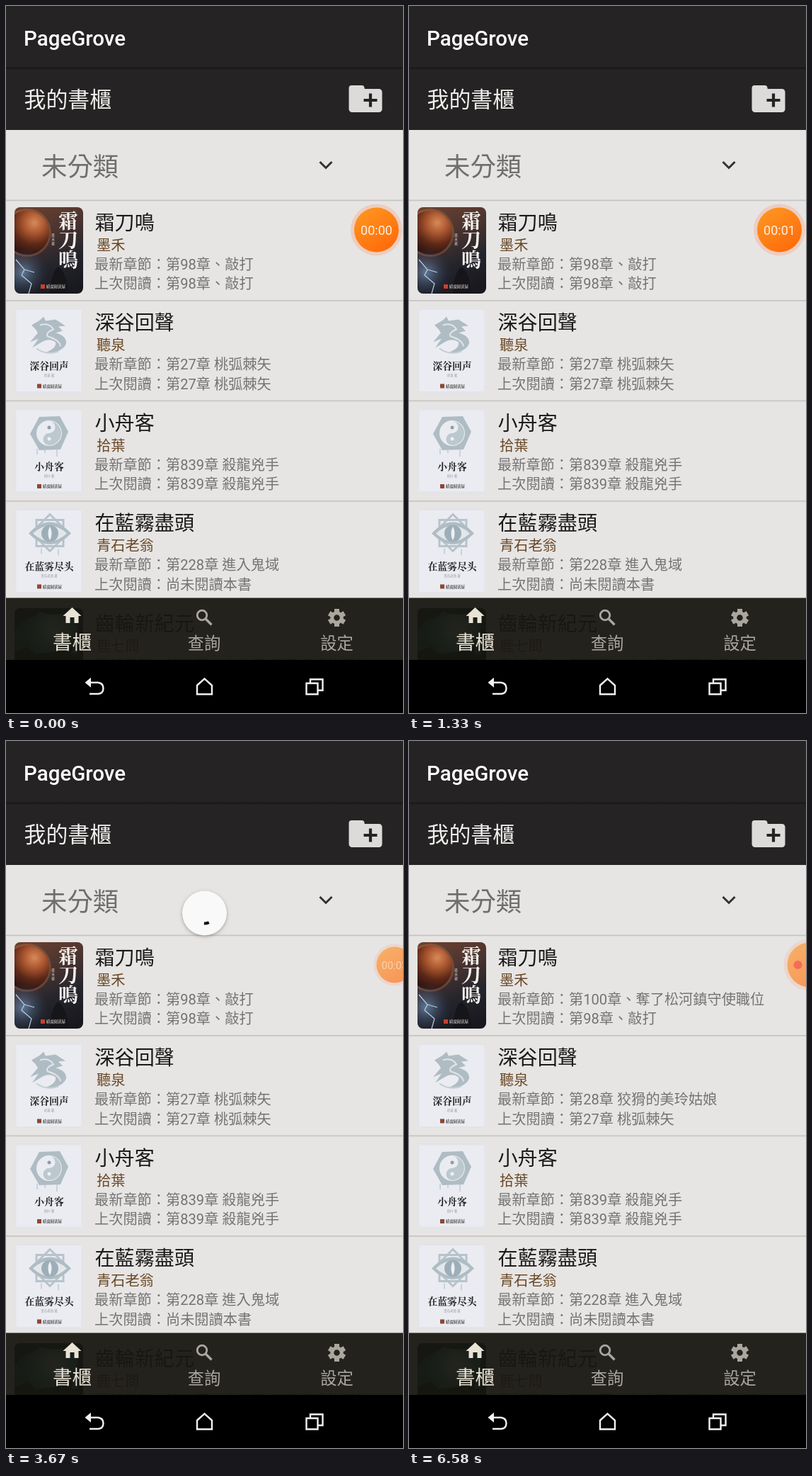
Write an HTML page with a canvas that moves like this. It is 561 px wide and 998 px high and loops after 8000 ms.

```html
<!DOCTYPE html>
<html lang="zh-Hant">
<head>
<meta charset="utf-8">
<style>
html, body { margin: 0; width: 100%; height: 100%; overflow: hidden; background: #000; }
canvas { display: block; }
</style>
</head>
<body>
<canvas id="stage" width="561" height="998"></canvas>
<script>
const c = document.getElementById('stage').getContext('2d');
const SANS = 'Roboto, "Noto Sans CJK TC", "Noto Sans CJK", sans-serif';
const SERIF = '"Noto Serif CJK SC", "Noto Sans CJK SC", "Noto Sans CJK", serif';
const LOOP = 8000, FPS = 12, TAU = Math.PI * 2, RAD = Math.PI / 180;
const BAR = '#252324', PAPER = '#e7e5e3', STEEL = '#afbcc4';

const books = [
  { title: '霜刀鳴', author: '墨禾', latest: '第98章、敲打', last: '第98章、敲打',
    updated: '第100章、奪了松河鎮守使職位', art: planetCover },
  { title: '深谷回聲', author: '聽泉', latest: '第27章 桃弧棘矢', last: '第27章 桃弧棘矢',
    updated: '第28章 狡猾的美玲姑娘', art: paleCover('深谷回声', '听泉 著', dragon) },
  { title: '小舟客', author: '拾葉', latest: '第839章 殺龍兇手', last: '第839章 殺龍兇手',
    art: paleCover('小舟客', '拾叶 著', hexagon) },
  { title: '在藍霧盡頭', author: '青石老翁', latest: '第228章 進入鬼域', last: '尚未閱讀本書',
    art: paleCover('在蓝雾尽头', '青石老翁 著', eye) },
  { title: '齒輪新紀元', author: '鹿七問', latest: '第四百二十八章 不聽招呼的源能',
    last: '第四百二十八章 不聽招呼的源能', art: moonCover },
];

// ---------- helpers ----------
const clamp = x => Math.max(0, Math.min(1, x));

function track(t, keys) {
  let i = 1;
  while (i < keys.length - 1 && t > keys[i][0]) i++;
  const [t0, v0] = keys[i - 1], [t1, v1] = keys[i];
  return v0 + (v1 - v0) * clamp((t - t0) / (t1 - t0));
}

// cubic-bezier(.4, 0, .2, 1)
function fastOutSlowIn(x) {
  let lo = 0, hi = 1;
  for (let i = 0; i < 20; i++) {
    const u = (lo + hi) / 2, v = 1 - u;
    if (1.2 * v * v * u + 0.6 * v * u * u + u * u * u < x) lo = u; else hi = u;
  }
  return lo * lo * (3 - 2 * lo);
}

// y is the vertical centre of the ideographs
function text(s, x, y, size, color, { weight = 400, font = SANS, align = 'left' } = {}) {
  c.font = `${weight} ${size}px ${font}`;
  c.textAlign = align;
  c.fillStyle = color;
  c.fillText(s, x, y + size * 0.38);
}

function rect(x, y, w, h, color) { c.fillStyle = color; c.fillRect(x, y, w, h); }

function disc(x, y, r, color) {
  c.fillStyle = color;
  c.beginPath(); c.arc(x, y, r, 0, TAU); c.fill();
}

function shape(d, color, x = 0, y = 0) {
  c.save(); c.translate(x, y);
  c.fillStyle = color; c.fill(new Path2D(d), 'evenodd');
  c.restore();
}

function line(d, color, width, x = 0, y = 0) {
  c.save(); c.translate(x, y);
  c.strokeStyle = color; c.lineWidth = width; c.stroke(new Path2D(d));
  c.restore();
}

function addStops(g, colors) {
  colors.forEach((k, i) => g.addColorStop(i / (colors.length - 1), k));
  return g;
}
const gradient = (x0, y0, x1, y1, ...colors) => addStops(c.createLinearGradient(x0, y0, x1, y1), colors);
const glow = (x, y, r, ...colors) => addStops(c.createRadialGradient(x, y, 0, x, y, r), colors);

// ---------- covers, drawn in a 97 x 122 box ----------
function imprint(x, y, mark, color) {
  rect(x, y - 3, 6, 6, mark);
  text('晴窗阅读屋', x + 8, y, 5.4, color, { weight: 700, font: SERIF });
}

function planetCover() {
  rect(0, 0, 97, 122, gradient(20, 0, 70, 122, '#6a4030', '#4a3430', '#24242c', '#18181e'));
  disc(18, 36, 34, 'rgba(235,140,80,.25)');
  disc(18, 36, 31, glow(28, 22, 46, '#d78a58', '#a9552f', '#5c2817', '#2c1512'));
  rect(0, 60, 60, 62, glow(12, 92, 36, 'rgba(130,165,205,.65)', 'rgba(40,60,90,0)'));
  line('M2 74 L14 88 L10 96 L24 108 L20 122 M14 88 L28 92', '#b5cde6', 1.2);
  shape('M50 122 Q52 90 62 84 Q74 92 76 122Z', '#15151a');
  [...'霜刀鳴'].forEach((ch, i) =>
    text(ch, 76, 19 + i * 27.5, 28, '#f5f2ee', { weight: 900, font: SERIF, align: 'center' }));
  [...'墨禾著'].forEach((ch, i) => text(ch, 52, 39 + i * 6, 5, '#d8cfc8'));
  imprint(37, 112, '#c8402c', '#d0c8c4');
}

function paleCover(name, by, drawArt) {
  return () => {
    rect(0, 0, 97, 122, '#e3e4e8');
    rect(2.5, 3.5, 92, 115, '#eaecf1');
    drawArt();
    text(name, 49, 82.5, 13.8, '#242426', { weight: 700, font: SERIF, align: 'center' });
    text(by, 49, 96, 4.5, '#9a9ca0', { align: 'center' });
    imprint(32, 111, '#8d4636', '#3c3a3a');
  };
}

function dragon() {
  shape('M24 25 L36 18 L41 13 L44 19 L58 17 L72 26 L62 27 L68 33 L58 36 Q74 40 73 51 Q67 65 43 64 Q60 58 58 49 Q50 43 40 48 L25 57 L34 44 L22 49 L33 36 L30 31Z', STEEL);
  line('M36 25 Q49 21 55 31 Q43 36 47 41 Q64 46 65 55', '#dfe5e9', 2);
  line('M31 58 Q45 68 62 62', '#c3cdd4', 2);
}

function hexagon() {
  shape('M35 13 L64 12 L76 34 L65 59 L35 60 L22 37Z M49 18 A18 18 0 1 0 49 54 A18 18 0 1 0 49 18Z', STEEL);
  shape('M49 19 A17 17 0 0 1 49 53 A8.5 8.5 0 0 1 49 36 A8.5 8.5 0 0 0 49 19Z', '#bcc8cf');
  disc(49, 28, 2.5, '#8d9da8');
  disc(49, 44, 2.5, '#eef0f4');
  line('M32 58 V66 M43 60 V64 M60 59 V69', '#c0cad1', 1.5);
}

function eye() {
  line('M50 9 L76 35 L50 61 L24 35Z M31 17 H69 V54 H31Z', '#b7c3cb', 3);
  shape('M20 36 Q50 4 80 36 Q50 67 20 36Z', STEEL);
  shape('M26 36 Q50 14 74 36 Q50 58 26 36Z', '#e2e7eb');
  disc(50, 36, 12, '#9eaeb8');
  shape('M50 26 Q55 36 50 46 Q45 36 50 26Z', '#eef0f4');
  line('M38 57 V65 M62 58 V67', '#c0cad1', 1.5);
}

function moonCover() {
  rect(0, 0, 97, 122, gradient(0, 0, 20, 122, '#0a3f49', '#177a82', '#0a2c33', '#081417'));
  rect(0, 0, 97, 90, glow(56, 32, 54, '#d9f2ea', '#8fd0cb', 'rgba(40,150,155,.7)', 'rgba(10,60,70,0)'));
  shape('M0 0 H97 V46 L88 34 Q94 16 78 6 Q52 12 36 5 Q28 14 12 17 L0 32Z', '#08242b');
  shape('M0 62 L18 54 L30 65 L60 61 L82 53 L97 58 V122 H0Z', '#07191d');
  shape('M80 64 L85 48 L90 64Z', '#2a9aa0');
  text('齒輪新紀元', 44, 92, 16, '#c9d2d0', { weight: 900, align: 'center' });
}

// ---------- list ----------
function book(b, top, refreshed) {
  rect(0, top - 0.5, 561, 1.8, '#c8c6c4');
  c.save();
  c.translate(12, top + 10);
  c.beginPath(); c.roundRect(0, 0, 97, 122, 8); c.clip();
  b.art();
  c.restore();
  text(b.title, 125.5, top + 31, 28.1, '#1b1919');
  text(b.author, 128, top + 63, 20.2, '#684726');
  const latest = refreshed && b.updated || b.latest;
  text('最新章節：' + latest, 125, top + 90.3, 20.2, '#757372');
  text('上次閱讀：' + b.last, 125, top + 117.6, 20.2, '#757372');
}

function list(scroll, refreshed) {
  rect(0, 174, 561, 749, PAPER);
  text('未分類', 50, 226 - scroll, 36.4, '#706e6d');
  line('M443.5 220 l8.5 8.5 l8.5 -8.5', '#333131', 3, 0, -scroll);
  books.forEach((b, i) => book(b, 274 + i * 141.5 - scroll, refreshed));
  rect(0, 981 - scroll, 561, 1.8, '#c8c6c4');
}

function bottomTabs(shift) {
  const cream = '#e9e3d6', grey = '#aaa79f';
  c.save();
  c.translate(0, shift);
  rect(0, 835.5, 561, 90, 'rgba(24,23,16,.94)');
  shape('M-13 1 L0 -11 L13 1 H9 V11 H3 V3 H-3 V11 H-9 V1Z', cream, 93.5, 860);
  text('書櫃', 93.5, 897.5, 27.5, cream, { align: 'center' });

  c.strokeStyle = grey; c.lineWidth = 2.8;
  c.beginPath(); c.arc(277, 860, 6.8, 0, TAU); c.stroke();
  line('M282 865 L290.5 873.5', grey, 3.4);
  text('查詢', 280, 899, 23.3, grey, { align: 'center' });

  c.save();
  c.translate(467.5, 863.5);
  c.fillStyle = grey;
  for (let i = 0; i < 6; i++) { c.fillRect(-3.5, -12.5, 7, 8); c.rotate(TAU / 6); }
  c.lineWidth = 5; c.strokeStyle = grey;
  c.beginPath(); c.arc(0, 0, 6.8, 0, TAU); c.stroke();
  c.restore();
  text('設定', 467.5, 899, 23.3, grey, { align: 'center' });
  c.restore();
}

// ---------- pull-to-refresh indicator ----------
const RELEASE = 1698, SPIN = 1898, CYCLES = 2564, CYCLE = 1332, FREEZE = 6335;

function arcAngles(t) {
  if (t < SPIN) {
    const end = track(t, [[1417, -60], [1583, 34], [1698, 45]]);
    return [end - track(t, [[1400, 60], [1560, 288]]), end];
  }
  if (t < CYCLES) {
    const p = (t - SPIN) / (CYCLES - SPIN), end = 45 + 238 * p;
    return [end - 3.6 - 284.4 * (1 - fastOutSlowIn(p)), end];
  }
  const time = (Math.min(t, FREEZE) - CYCLES) / CYCLE;
  const n = Math.floor(time), p = time - n;
  const base = -77 + 216 * n + 291.6 * p;
  if (p < 0.5) return [base, base + 3.6 + 284.4 * fastOutSlowIn(2 * p)];
  return [base + 284.4 * fastOutSlowIn(2 * p - 1), base + 288];
}

function refresher(t) {
  if (t < 1340 || t > 6570) return;
  const y = track(t, [[1333, 142], [1417, 172], [1500, 238], [1583, 284], [RELEASE, 290], [SPIN, 243]]);
  const scale = track(t, [[6420, 1], [6570, 0]]);
  c.save();
  c.translate(280.5, y);
  c.scale(scale, scale);
  c.shadowColor = 'rgba(0,0,0,.3)'; c.shadowBlur = 5; c.shadowOffsetY = 1.5;
  disc(0, 0, 31.5, '#f9f9fa');
  c.shadowColor = 'transparent';

  const [start, end] = arcAngles(t);
  c.globalAlpha = t < 1540 ? 0.4 : 1;
  c.strokeStyle = '#111'; c.lineWidth = 4;
  c.beginPath(); c.arc(0, 0, 14.5, start * RAD, end * RAD); c.stroke();
  if (t < SPIN) {
    c.rotate(end * RAD);
    shape('M8 -1 H21 L14.5 7Z', '#111');
  }
  c.restore();
}

// ---------- floating recorder bubble ----------
function bubble(t) {
  const docked = t > 5900;
  const x = track(t, [[2900, 523.5], [3080, 549], [5850, 549], [6000, 566]]);
  const scale = track(t, [[2900, 1], [3080, 0.81], [5850, 0.81], [6000, 1]]);
  c.save();
  c.globalAlpha = track(t, [[1330, 1], [1500, 0.6]]);
  c.translate(x, 316);
  c.scale(scale, scale);
  disc(0, 0, 36.5, 'rgba(255,135,90,.26)');
  disc(0, 0, 31.5, gradient(-18, -28, 18, 28, '#ff931f', '#ff6b0a'));
  if (docked) {
    disc(-16.5, 0, 6, '#f04858');
  } else {
    const seconds = Math.floor(t / 1000);
    text('00:0' + seconds, 0, 0, 18, '#fff1e4', { align: 'center' });
  }
  c.restore();
}

// ---------- fixed bars ----------
function appBars() {
  rect(0, 0, 561, 175, BAR);
  rect(0, 86, 561, 4, gradient(0, 86, 0, 90, '#201e1f', '#1a1819', BAR));
  text('PageGrove', 25, 45, 29.5, '#fff', { weight: 500 });
  text('我的書櫃', 25.5, 131.5, 30.9, '#f1efec');
  c.fillStyle = '#dddbd9';
  c.beginPath();
  c.roundRect(484.5, 112, 22, 20, 4);
  c.roundRect(484.5, 117, 47, 33, 4.5);
  c.fill();
  shape('M502 112.5 L507.5 117.5 H502Z', '#dddbd9');
  line('M505.5 133 H524.5 M515 123.5 V142.5', BAR, 4.2);
}

function systemBar() {
  rect(0, 923, 561, 75, '#000');
  const white = '#f2f2f2';
  line('M114 955 H130 Q137.5 956 137.5 963 Q137.5 970.5 130 971 H118', white, 2.4);
  shape('M111.5 955 L120 948 V962Z', white);
  line('M270 959 L280.5 949.5 L291 959 V971.5 H270Z', white, 2.4);
  line('M424.5 956 H440.5 V971.5 H424.5Z M430 955 V950.5 H447.5 V966 H441', white, 2.4);
}

function draw(t) {
  const scroll = track(t, [[417, 0], [500, 8], [583, 32], [667, 59], [833, 75], [1000, 72],
                           [1167, 49], [1250, 27], [1333, 0]]);
  c.save();
  c.beginPath(); c.rect(0, 174, 561, 749); c.clip();
  list(scroll, t > 6490);
  refresher(t);
  bottomTabs(Math.max(0, 0.8 * (scroll - 22)));
  c.restore();
  appBars();
  systemBar();
  bubble(t);
}

const began = performance.now();
function tick() {
  const t = (performance.now() - began) % LOOP;
  draw(Math.floor((t + 4) * FPS / 1000) * 1000 / FPS);
  requestAnimationFrame(tick);
}
tick();
</script>
</body>
</html>
```
